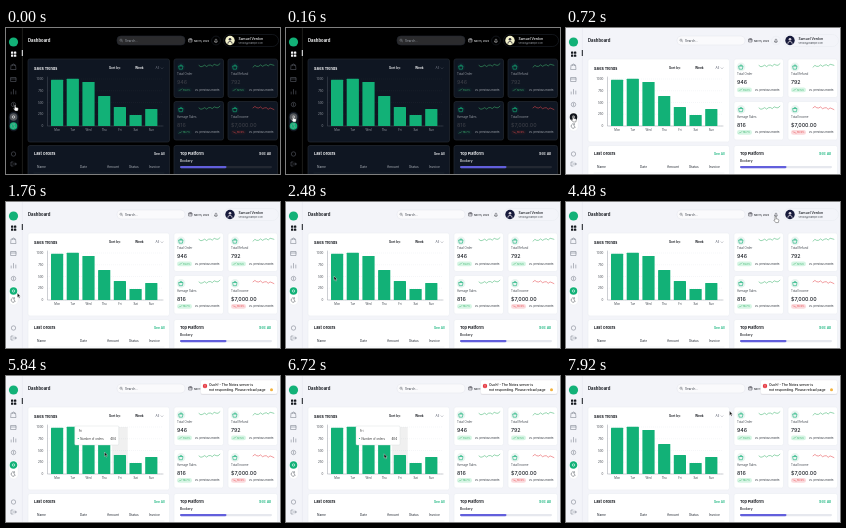
Animation, 274 px wide and 146 px high, one loop 8 s. Source, as an HTML page:

```html
<!DOCTYPE html>
<html lang="en">
<head>
<meta charset="utf-8">
<title>Dashboard</title>
<style>
html, body { margin: 0; width: 100%; height: 100%; overflow: hidden; }
svg {
  display: block; width: 274px; height: 146px; font-family: Inter, sans-serif;
  --bg: #f3f4f9; --card: #fff; --text: #16191f; --value: #1c2027; --dim: #6f7580;
  --note: #3f444c; --line: #e6e8ee; --side: #e3e5ec; --edge: #edeff4; --chip: #eaf5f1;
  --good: #d6f5e4; --bad: #fbd9dc; --search: #fafafc; --avatar: #171a3b; --face: #d9d2dc;
  --green: #12b177; --link: #18b57e;
}
svg.dark {
  --bg: #000; --card: #0f1622; --text: #f4f5f7; --value: #3a3d45; --dim: #666b76;
  --note: #9a9fa7; --line: #232832; --side: #3a3835; --edge: #252a33; --chip: #0f1d29;
  --good: #0f1c26; --bad: #1a1822; --search: #2b2b2d; --avatar: #f3f2cb; --face: #34323c;
  --link: #f4f5f7;
}
</style>
</head>
<body>
<svg id="stage" class="dark" viewBox="0 0 274 146"></svg>
<script>
const NS = 'http://www.w3.org/2000/svg';
const stage = document.getElementById('stage');
const LOOP = 8000, LIGHT_AT = 720;

function add(tag, attrs, parent = stage) {
  const el = document.createElementNS(NS, tag);
  for (const k in attrs) el.setAttribute(k, attrs[k]);
  parent.append(el);
  return el;
}
const group = () => add('g', {});
const box = (x, y, width, height, fill, rx = 0, more = {}, parent) =>
  add('rect', { x, y, width, height, fill, rx, ...more }, parent);
const dot = (cx, cy, r, fill, more = {}, parent) =>
  add('circle', { cx, cy, r, fill, ...more }, parent);
const stroke = (d, color, width = 0.5, parent) =>
  add('path', { d, fill: 'none', stroke: color, 'stroke-width': width,
    'stroke-linecap': 'round', 'stroke-linejoin': 'round' }, parent);
function label(x, y, str, size, fill = 'var(--text)', weight = 400, parent, anchor = 'start') {
  const el = add('text', { x, y, fill, 'font-size': size, 'font-weight': weight,
    'text-anchor': anchor }, parent);
  el.textContent = str;
  return el;
}

const TEXT = 'var(--text)', DIM = 'var(--dim)', NOTE = 'var(--note)', LINE = 'var(--line)';
const CARD = 'var(--card)', GREEN = 'var(--green)';
const card = (x, y, w, h) =>
  box(x, y, w, h, CARD, 2, { stroke: 'var(--edge)', 'stroke-width': 0.7 });

box(0, 0, 274, 146, 'var(--bg)');

// Sidebar
stroke('M16.4 0V146', 'var(--side)');
box(15.8, 22, 1, 6, TEXT);
dot(7.5, 14, 4.6, GREEN);
for (const [x, y] of [[5, 23.5], [8, 23.5], [5, 26.5], [8, 26.5]]) box(x, y, 2.3, 2.3, TEXT, 0.4);
stroke('M5.5 37h4l.5 4.5h-5zM6.3 37.5a1.2 1.5 0 0 1 2.4 0', DIM);
stroke('M5 49.5h5v4h-5zM5 51h5', DIM);
stroke('M5.2 66v-2M7.5 66v-4.5M9.8 66v-3', DIM);
dot(7.5, 76.5, 2.2, 'none', { stroke: DIM, 'stroke-width': 0.5 });
stroke('M7.5 75.5v2', DIM);
box(3, 84, 9.2, 19, CARD, 4.6, { stroke: LINE, 'stroke-width': 0.4 });
const sun = dot(7.5, 89, 3.8, GREEN);
dot(7.5, 89, 1.2, 'none', { stroke: '#fff', 'stroke-width': 0.6 });
const moon = dot(7.5, 98, 3.8, GREEN);
stroke('M8.2 96a2.2 2.2 0 1 0 1.1 3a2 2 0 0 1-1.1-3z', NOTE);
dot(7.5, 126, 2.2, 'none', { stroke: DIM, 'stroke-width': 0.5 });
stroke('M7 134h-2v4h2M6.8 136h3.5M9 134.8l1.3 1.2l-1.3 1.2', DIM);

// Header
label(22, 13.9, 'Dashboard', 4.2, TEXT, 700);
box(111, 8, 68, 9, 'var(--search)', 4, { stroke: LINE, 'stroke-width': 0.6 });
dot(115, 12.2, 1.1, 'none', { stroke: NOTE, 'stroke-width': 0.4 });
stroke('M115.8 13l.8 .8', NOTE, 0.4);
label(119, 13.6, 'Search...', 3.1, NOTE);
stroke('M183 11h3v3h-3zM183 12h3M184 10.4v1M185 10.4v1', TEXT, 0.4);
label(188, 13.5, 'Nov 15, 2023', 2.4, TEXT, 500);
dot(210, 12.5, 4.4, 'none', { stroke: LINE, 'stroke-width': 0.5 });
stroke('M208.6 13.8h2.8q-.6-.6-.6-1.9a.8 .8 0 0 0-1.6 0q0 1.3-.6 1.9M209.7 14.5h.6', TEXT, 0.4);
box(217.5, 6.5, 55, 12, 'none', 6, { stroke: LINE, 'stroke-width': 0.5 });
dot(224, 12.5, 4.7, 'var(--avatar)');
dot(224, 11.3, 1.3, 'var(--face)');
stroke('M221.8 15.4a2.2 2 0 0 1 4.4 0', 'var(--face)', 0.8);
label(232.5, 11.6, 'Samuel Verdon', 3.4, TEXT, 500);
label(232.5, 16, 'verdon@example.com', 2.3, NOTE);

// Sales chart
const DAYS = ['Mon', 'Tue', 'Wed', 'Thu', 'Fri', 'Sat', 'Sun'];
const TOPS = [51.8, 50.8, 54, 68, 79, 87, 81];
const BASE = 98, FIRST = 45, PITCH = 15.7, BAR = 12.2;
const centre = i => FIRST + BAR / 2 + i * PITCH;

card(22, 31, 141.5, 83);
label(28, 41.5, 'Sales Trends', 3.7, TEXT, 700);
label(103, 41.2, 'Sort by:', 3.2, TEXT, 600);
label(129, 41.2, 'Week', 3.2, TEXT, 600);
label(149.5, 41.2, 'All', 3, DIM, 500);
stroke('M155 39.8l1 1l1-1', DIM, 0.4);
[1000, 750, 500, 250, 0].forEach((n, i) => {
  const y = 51 + i * 11.75;
  add('path', { d: `M41 ${y}H157`, stroke: LINE, 'stroke-width': 0.4, 'stroke-dasharray': '1 1' });
  label(37.5, y + 1, n, 3, NOTE, 400, stage, 'end');
});
stroke(`M41.5 49V${BASE}H157`, DIM, 0.35);
const band = box(0, 51, PITCH, BASE - 51, '#000', 0, { opacity: 0.06 });
TOPS.forEach((top, i) => {
  box(centre(i) - BAR / 2, top, BAR, BASE - top, GREEN, 0.5);
  label(centre(i), 103.2, DAYS[i], 2.8, NOTE, 400, stage, 'middle');
});

// Small statistic cards
const RED = '#e5484d', RISE = '#3fb56f';
function stat(x, y, name, value, change, color) {
  const rising = color !== RED;
  const slope = rising ? 0.16 : -0.16;
  card(x, y, 49.5, 38.5);
  dot(x + 7, y + 8, 4.4, 'var(--chip)');
  stroke(`M${x + 5} ${y + 7}h4l-.6 3.2h-2.8zM${x + 6} ${y + 7}a1 1.3 0 0 1 2 0`, GREEN, 0.6);
  let d = '';
  for (let i = 0; i < 12; i++) {
    const py = y + 6.5 - slope * (i - 5.5) + Math.sin(i * 2.3 + x) * 0.9;
    d += `${i ? 'L' : 'M'}${x + 25 + i * 1.9} ${py.toFixed(2)}`;
  }
  stroke(d, color, 0.55);
  label(x + 3, y + 16, name, 2.9, NOTE);
  label(x + 3, y + 25, value, 5.3, 'var(--value)', 500);
  box(x + 3, y + 28.5, 15, 4.8, rising ? 'var(--good)' : 'var(--bad)', 2.4);
  const [ay, up] = rising ? [31.8, -1] : [30, 1];
  stroke(`M${x + 5} ${y + ay}l1 ${up * 1.2}l.8 ${up * -0.6}l1.2 ${up * 1.4}`, color, 0.4);
  label(x + 9, y + 31.9, change, 2.5, color, 500);
  label(x + 21, y + 31.9, 'vs. previous month', 2.7, NOTE, 500);
}
stat(168, 31, 'Total Order', '946', '14.2%', RISE);
stat(222, 31, 'Total Refund', '792', '12.5%', RISE);
stat(168, 73.5, 'Average Sales', '816', '18.7%', RISE);
stat(222, 73.5, 'Total Income', '$7,000.00', '10.4%', RED);

// Lower cards
card(22, 117.5, 141.5, 32);
label(28, 127.3, 'Last Orders', 3.8, TEXT, 700);
label(148, 127.2, 'See All', 3.2, 'var(--link)', 600);
[['Name', 31], ['Date', 74], ['Amount', 101], ['Status', 123], ['Invoice', 143]]
  .forEach(([s, x]) => label(x, 140.2, s, 3.2, NOTE, 500));
stroke('M28 145H158', LINE);
card(168, 117.5, 103.5, 32);
label(174, 127.3, 'Top Platform', 3.8, TEXT, 700);
label(253, 127.2, 'See All', 3.7, 'var(--link)', 600);
label(174, 134.2, 'Bookery', 3.2, TEXT, 500);
box(174, 138, 92, 2.2, LINE, 1.1);
box(174, 138, 46.5, 2.2, '#625fdc', 1.1);

// Chart tooltip
const tip = group();
box(0, 0, 44, 19, '#fff', 1, { stroke: '#d5d8dc', 'stroke-width': 0.4 }, tip);
const tipDay = label(4, 6, '', 2.8, '#333', 400, tip);
dot(3.5, 12.5, 0.6, GREEN, {}, tip);
label(5.5, 13.5, 'Number of orders', 2.8, '#333', 400, tip);
const tipValue = label(41, 13.5, '', 2.8, '#333', 500, tip, 'end');

// Error message
const toast = group();
box(194.5, 5, 77, 14, '#000', 2, { opacity: 0.08 }, toast);
box(194.5, 4, 77, 14, '#fff', 2, { stroke: '#e9e6ea', 'stroke-width': 0.4 }, toast);
dot(199, 10, 2.2, '#e5343d', {}, toast);
stroke('M199 8.9v1.2M199 11.2v.02', '#fff', 0.5, toast);
label(203, 10.4, 'Ouch! - The Notes server is', 3.35, '#111', 500, toast);
label(203, 15, 'not responding. Please reload page', 3.35, '#111', 500, toast);
dot(265.5, 13.8, 1.5, '#f3b13c', {}, toast);

// Pointers
const arrow = group();
add('path', { d: 'M0 0V4.4L1 3.5L1.8 5.2L2.5 4.8L1.8 3.2H3.1Z', fill: '#111',
  stroke: '#fff', 'stroke-width': 0.35 }, arrow);
const hand = group();
add('path', { d: 'M0 0q.8-.6 1.2 .2v2l2 .5q.8 .3 .6 1.4l-.5 1.9h-2.6l-1.8-2.3q0-.8 1.1-.1z',
  fill: '#fff', stroke: '#222', 'stroke-width': 0.4 }, hand);

// Rows are [time, x, y]
const PATH = [
  [0, 8.5, 77], [160, 6.5, 88], [1680, 6.5, 88], [1840, 16, 94], [2480, 48, 74], [2720, 100, 82],
  [2960, 157, 93], [3360, 197, 95], [3520, 200, 90], [4240, 209, 15], [5040, 209, 13],
  [5440, 150, 55], [5680, 106, 70], [5840, 98.5, 76], [6240, 97, 90], [6640, 98, 78],
  [7040, 99, 76], [7680, 163, 41], [7920, 163.5, 35], [8000, 163.5, 35]
];
const TIP_PATH = [
  [0, 48, 49], [2560, 48, 49], [2960, 102, 49], [5400, 102, 49],
  [5700, 70, 50], [6240, 62.5, 50], [6700, 70, 50], [8000, 70, 50]
];
const TIP_REACH = 44;
const ease = p => p * p * (3 - 2 * p);
const clamp = (v, a, b) => Math.max(a, Math.min(b, v));
function along(rows, t) {
  const i = clamp(rows.findIndex(r => r[0] > t), 1, rows.length - 1);
  const [t0, x0, y0] = rows[i - 1], [t1, x1, y1] = rows[i];
  const p = ease(clamp((t - t0) / (t1 - t0), 0, 1));
  return [x0 + (x1 - x0) * p, y0 + (y1 - y0) * p];
}
const show = (el, on) => el.setAttribute('visibility', on ? 'visible' : 'hidden');
const move = (el, x, y) => el.setAttribute('transform', `translate(${x} ${y})`);

function draw(t) {
  const dark = t < LIGHT_AT;
  stage.classList.toggle('dark', dark);
  sun.setAttribute('fill', dark ? '#55585c' : t < 1680 ? '#11141b' : GREEN);
  show(moon, dark);

  const [x, y] = along(PATH, t);
  const pressing = t < 1760 || (t >= 4240 && t < 5120);
  show(hand, pressing);
  show(arrow, !pressing);
  move(hand, x, y);
  move(arrow, x, y);

  // The tooltip ends at the centre of the active bar
  const hovering = (t >= 2560 && t < 3120) || (t >= 5440 && t < 7520);
  const [tipX, tipY] = along(TIP_PATH, t);
  const day = clamp(Math.round((tipX + TIP_REACH - centre(0)) / PITCH), 0, 6);
  show(tip, hovering);
  show(band, hovering);
  move(tip, tipX, tipY);
  band.setAttribute('x', centre(day) - PITCH / 2);
  tipDay.textContent = DAYS[day];
  tipValue.textContent = Math.round((BASE - TOPS[day]) / 47 * 1000);

  show(toast, t >= 4640);
  move(toast, 0, -18 * (1 - ease(clamp((t - 4600) / 360, 0, 1))));
}
const start = performance.now();
function tick() {
  draw((performance.now() - start) % LOOP);
  requestAnimationFrame(tick);
}
draw(0);
requestAnimationFrame(tick);
</script>
</body>
</html>
```
